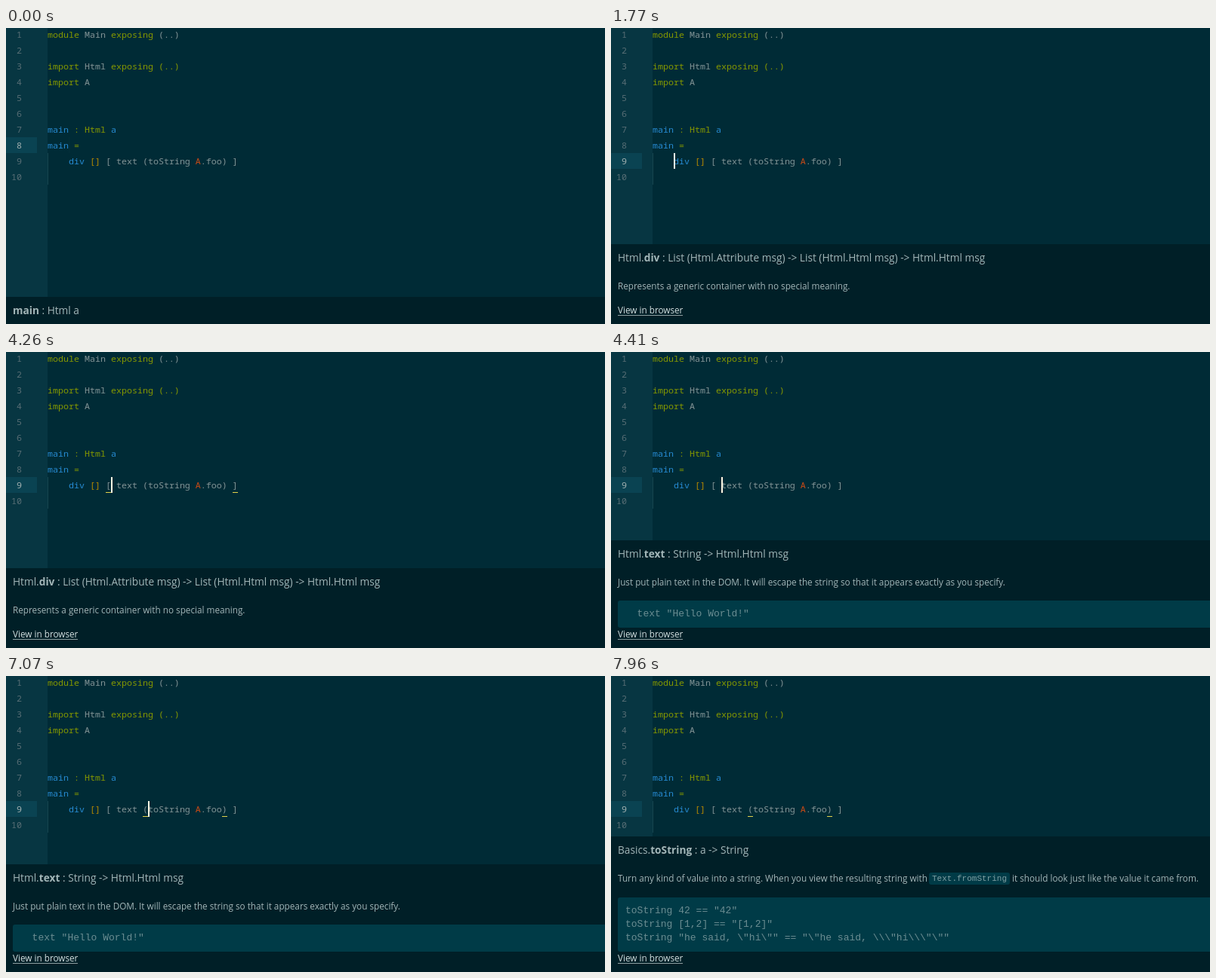
An HTML page for the animation above (8000 ms loop, 793 by 393 pixels).

```html
<!DOCTYPE html>
<html lang="en">
<head>
<meta charset="utf-8">
<title>Editor with type hints</title>
<style>
html, body { margin: 0; width: 100%; height: 100%; overflow: hidden; background: #002b36; }
#stage { position: relative; width: 793px; height: 393px; overflow: hidden; background: #002b36; }
#stage div { position: absolute; white-space: pre; }
#gutter { left: 0; top: 0; width: 55px; height: 393px; background: #073642; }
#active { left: 0; width: 41px; height: 21px; background: #0a4352; }
#guide { left: 55px; top: 166px; width: 1px; height: 42px; background: #17454f; }
.code, .num { font: 11.667px/21px "Noto Sans Mono", "DejaVu Sans Mono", monospace; color: #839496; }
.code { left: 55px; }
.num { left: 0; width: 21px; text-align: right; color: #586e75; }
.num.on { color: #a3b1b1; }
.g { color: #859900; }
.b { color: #268bd2; }
.y { color: #b58900; }
.o { color: #cb4b16; }
#cursor { width: 2px; height: 21px; background: #fdf6e3; }
.match { top: 186px; width: 7px; height: 1px; background: #e2d24a; }
#stage .panel { left: 0; width: 793px; bottom: 0; background: #001f27; color: #a3b6b8;
  font: 11.74px/20px "Open Sans", "Noto Sans", sans-serif; }
.panel .head { left: 9px; top: 8px; font-size: 13.7px; }
.panel .desc { left: 9px; top: 45px; }
.panel .link { left: 9px; bottom: 11px; height: 14px; line-height: 15px;
  color: #d5e0e1; border-bottom: 1px solid #8fa0a2; }
.panel .block { left: 9px; right: -9px; bottom: 27px; padding: 9px 10px; border-radius: 3px;
  background: #003b47; color: #6b8d92;
  font: 13px/18px "Liberation Mono", "Courier New", monospace; }
.panel .chip { left: 421px; top: 48px; width: 107px; height: 16px; border-radius: 3px; text-align: center;
  background: #003b47; color: #7f9fa3; font: 11px/16px "Liberation Mono", "Courier New", monospace; }
</style>
</head>
<body>
<div id="stage">
  <div id="gutter"></div>
  <div id="active"></div>
  <div id="guide"></div>
  <div id="text"></div>
  <div class="match"></div>
  <div class="match"></div>
  <div id="cursor"></div>

  <div class="panel" style="height:36px"><div class="head"><b>main</b> : Html a</div></div>

  <div class="panel" style="height:106px"><div class="head">Html.<b>div</b> : List (Html.Attribute msg) -&gt; List (Html.Html msg) -&gt; Html.Html msg</div><div class="desc">Represents a generic container with no special meaning.</div><div class="link">View in browser</div></div>

  <div class="panel" style="height:143px"><div class="head">Html.<b>text</b> : String -&gt; Html.Html msg</div><div class="desc">Just put plain text in the DOM. It will escape the string so that it appears exactly as you specify.</div><div class="block">  text "Hello World!"</div><div class="link">View in browser</div></div>

  <div class="panel" style="height:180px"><div class="head">Basics.<b>toString</b> : a -&gt; String</div><div class="desc">Turn any kind of value into a string. When you view the resulting string with</div><div class="chip">Text.fromString</div><div class="desc" style="left:531px">it should look just like the value it came from.</div><div class="block">toString 42 == "42"
toString [1,2] == "[1,2]"
toString "he said, \"hi\"" == "\"he said, \\\"hi\\\"\""</div><div class="link">View in browser</div></div>
</div>
<script>
const LOOP = 8000, TICK = 147.55, CHAR = 7, LEFT = 55;
const $ = id => document.getElementById(id);
const rowTop = row => 21 * row - 23;

const lines = [
  '<span class="g">module</span> Main <span class="g">exposing</span> (..)',
  '',
  '<span class="g">import</span> Html <span class="g">exposing (..)</span>',
  '<span class="g">import</span> A',
  '',
  '',
  '<span class="b">main</span> <span class="g">: Html</span> <span class="b">a</span>',
  '<span class="b">main</span> <span class="g">=</span>',
  '    <span class="b">div</span> <span class="y">[]</span> [ text (toString <span class="o">A</span>.foo) ]',
  ''
];
$('text').innerHTML = lines.map((line, i) => {
  const top = `style="top:${rowTop(i + 1)}px"`;
  return `<div class="num" ${top}>${i + 1}</div><div class="code" ${top}>${line}</div>`;
}).join('');

// [time, row, column]
const moves = [
  [0, 8, 4], [1475, 9, 4],
  [3235, 9, 5], [3385, 9, 6], [3525, 9, 7],
  [3825, 9, 8], [3975, 9, 10], [4115, 9, 12], [4265, 9, 13],
  [6335, 9, 14], [6475, 9, 15], [6615, 9, 16],
  [6765, 9, 17], [6915, 9, 18], [7065, 9, 19]
];
// [time, panel index]
const hints = [[0, 0], [1765, 1], [4405, 2], [7365, 3]];
// [from, to, start of fading]
const blinks = [[0, 1475, -430], [1905, 3235, 1905], [4600, 6335, 4600], [7560, LOOP, 7560]];
const brackets = [[8, 9], [11, 35], [18, 33]];

const nums = document.querySelectorAll('.num');
const panels = document.querySelectorAll('.panel');
const marks = document.querySelectorAll('.match');
const last = (table, time) => table.filter(step => step[0] <= time).pop();

// The fade advances in even ticks, as on a screen recording.
function opacity(time) {
  const blink = blinks.find(([from, to]) => time >= from && time < to);
  if (!blink) return 1;
  const tick = 140 + TICK * Math.floor((time - 120) / TICK);
  const age = Math.max(0, tick - blink[2]);
  return (1 + Math.cos(Math.PI * age / 400)) / 2;
}

function draw(time) {
  const [, row, col] = last(moves, time);
  const [, shown] = last(hints, time);
  const top = rowTop(row) + 'px';

  $('active').style.top = top;
  nums.forEach((num, i) => num.classList.toggle('on', i === row - 1));
  Object.assign($('cursor').style, { top, left: LEFT + CHAR * col + 'px', opacity: opacity(time) });

  const pair = row === 9 && brackets.find(p => p.some(c => col === c || col === c + 1));
  marks.forEach((mark, i) => {
    mark.style.display = pair ? '' : 'none';
    if (pair) mark.style.left = LEFT + CHAR * pair[i] + 'px';
  });
  panels.forEach((panel, i) => panel.style.display = i === shown ? '' : 'none');
}

const start = performance.now();
function frame() {
  draw(Math.max(0, performance.now() - start) % LOOP);
  requestAnimationFrame(frame);
}
frame();
</script>
</body>
</html>
```
